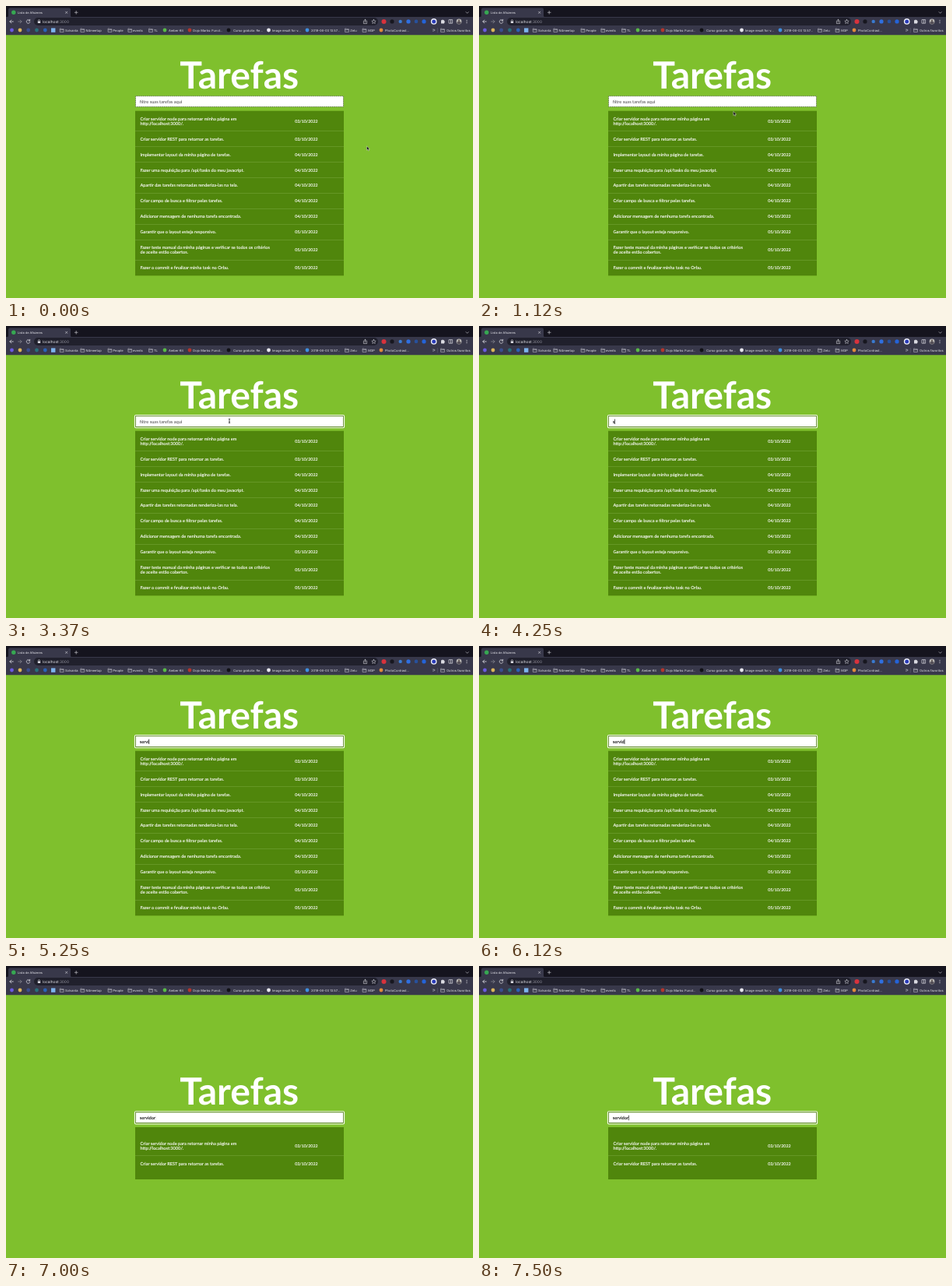
Write an HTML page that moves like this. It is 600 px wide and 375 px high and loops after 8000 ms.

```html
<!DOCTYPE html>
<html lang="pt-BR">
<head>
<meta charset="utf-8">
<title>Lista de Afazeres</title>
<style>
  html, body { margin: 0; width: 100%; height: 100%; overflow: hidden; background: #7fc02d; }
  svg { display: block; width: 100vw; height: 100vh; }
  text { font-family: Lato, "Open Sans", sans-serif; text-rendering: geometricPrecision; white-space: pre; }
  .ui text { font-family: Inter, Roboto, sans-serif; fill: #e6e6ec; }
  .title { font-size: 48px; font-weight: 700; fill: #fff; text-anchor: middle; }
  .task { font-size: 5.63px; fill: #fff; stroke: #fff; stroke-width: .13px; }
  .date { font-size: 5.3px; }
  .field { font-size: 5.7px; }
  .line { fill: none; stroke: #d9d9e0; stroke-width: .8; stroke-linecap: round; stroke-linejoin: round; }
</style>
</head>
<body>
<svg id="stage" viewBox="0 0 600 375" preserveAspectRatio="none">
  <rect width="600" height="375" fill="#7fc02d"/>
  <g id="ui" class="ui">
    <rect width="600" height="15" fill="#15141e"/>
    <path d="M0 14H1.5Q3 14 3 12.500V4.500Q3 2.500 5 2.500H81Q83 2.500 83 4.500V12.500Q83 14 84.500 14H600V37.300H0Z" fill="#38384a"/>
    <rect x="36" y="15" width="442" height="10" rx="5" fill="#20202c"/>
    <circle cx="9.800" cy="8.300" r="2.700" fill="#36a852"/>
    <g class="line">
      <path d="M76.500 7.200l2.300 2.300m0-2.300l-2.300 2.300M88.300 8.300h3.800m-1.900-1.900v3.800" stroke-width=".6"/>
      <path d="M591 7.700l1.600 1.600l1.600-1.600" stroke-width=".6"/>
      <path d="M9.300 20H4.900m2-2l-2 2l2 2"/>
      <path d="M15.700 20h4.400m-2-2l2 2l-2 2" stroke="#85858f"/>
      <path d="M30.500 18.700a2.300 2.300 0 1 0 .3 2M30.700 17.300v1.600h-1.600"/>
      <path d="M460 19.300h-.6v3.300h4.200v-3.300h-.6M461.500 21v-3.800m-1.200 1.200l1.200-1.200l1.200 1.200" stroke-width=".6"/>
      <path d="M472.500 17.300l.8 1.800l1.900.2l-1.400 1.300l.4 1.900l-1.700-1l-1.700 1l.4-1.900l-1.400-1.300l1.900-.2z" stroke-width=".55"/>
      <path d="M41.400 19.500v-.8a1.100 1.100 0 0 1 2.200 0v.8" stroke-width=".6"/>
      <path d="M548.400 29.800l1.200 1.200l-1.200 1.200m1.600-2.400l1.200 1.200l-1.200 1.200" stroke-width=".6"/>
    </g>
    <rect x="40.800" y="19.400" width="3.400" height="2.700" rx=".4" fill="#d9d9e0"/>
    <path d="M559 18.300h1.200a.8.8 0 0 1 1.600 0h1.300v1.300a.8.8 0 0 1 0 1.600v1.300h-4.100z" fill="#d9d9e0"/>
    <path d="M569 17.600h4.600v4.600h-4.600zM571.500 17.600v4.600" fill="none" stroke="#d9d9e0" stroke-width=".7"/>
    <circle cx="582" cy="20" r="3.400" fill="#b9b7b5"/>
    <path d="M579.300 22a2.700 2.200 0 0 1 5.400 0a3.400 3.400 0 0 1-5.400 0z" fill="#555058"/>
    <circle cx="582" cy="18.800" r="1.200" fill="#665d5a"/>
    <path d="M554.300 28v6.500" stroke="#66667a" stroke-width=".5"/>
  </g>
  <g id="head">
    <text class="title" x="299.700" y="105.700">Tarefas</text>
    <rect id="ring" x="165.400" y="114.500" width="269.200" height="16.300" rx="1.500" fill="none" stroke="#f6fcec" stroke-width="1.100"/>
    <rect id="box" x="166.500" y="115.700" width="267" height="13.700" fill="#fff" stroke="#3a4530" stroke-width=".8"/>
    <text id="field" class="field" x="171.700" y="124.600"></text>
    <rect id="caret" y="119.600" width=".7" height="6.400" fill="#111"/>
  </g>
  <rect id="panel" x="166" width="268" fill="#50860c"/>
  <g id="rows"></g>
  <g id="arrow">
    <path d="M0 0V5.200L1.250 4.100L2.100 6L3 5.600L2.150 3.700H3.800Z" fill="#111" stroke="#fff" stroke-width=".4"/>
  </g>
  <path id="beam" d="M-1.100-2.700Q0-2.700 0-2V2Q0 2.700-1.100 2.700M1.100-2.700Q0-2.700 0-2M0 2Q0 2.700 1.100 2.700M-.6.900H.6" fill="none" stroke="#111" stroke-width=".7"/>
</svg>
<script>
const $ = id => document.getElementById(id);

function add(parent, tag, attrs, text) {
  const el = document.createElementNS("http://www.w3.org/2000/svg", tag);
  for (const key in attrs) el.setAttribute(key, attrs[key]);
  if (text) el.textContent = text;
  parent.appendChild(el);
  return el;
}

// Browser bar
const ui = $("ui");
const label = (x, y, size, text, fill = "#e6e6ec") =>
  add(ui, "text", { x, y, "font-size": size, style: "fill:" + fill }, text);
const dot = (x, y, r, fill) => add(ui, "circle", { cx: x, cy: y, r, fill });
const folder = x => add(ui, "path", {
  d: `M${x - 2.4} 29h1.700l.6.700h2.500v3.700h-4.800zM${x - 2.4} 30.600h4.800`,
  fill: "none", stroke: "#c9c9d2", "stroke-width": .55
});

label(15, 9.8, 3.9, "Lista de Afazeres");
const host = label(47, 21.6, 4.8, "localhost");
add(host, "tspan", { fill: "#9a9aa6" }, ":3000");

[[485.5, 3, "#d8323c"], [496, 2.6, "#17171f"], [506.700, 2.2, "#3a7bd0"],
 [517, 2.6, "#2f6fe0"], [527, 2.3, "#27509c"], [537, 2.6, "#2463d8"],
 [549.700, 3.8, "#f2f3fa"], [549.700, 2.5, "#2a3bb8"]
].forEach(([x, r, fill]) => dot(x, 19.9, r, fill));
[18.2, 20, 21.8].forEach(y => dot(592, y, .55, "#d9d9e0"));

[[7.5, "#6a5ae0"], [18, "#d9b45a"], [28.700, "#3a4f8e"], [39.5, "#28707a"], [50.3, "#2a62b8"],
 [204, "#58b947"], [236, "#b3362d"], [286, "#111116"], [337.5, "#e8e8ee"],
 [387, "#3f8fe0"], [482, "#e08a3c"]
].forEach(([x, fill]) => dot(x, 31, 2.4, fill));
add(ui, "rect", { x: 58, y: 28.4, width: 5.4, height: 5.4, fill: "#7db4ee" });
[71.700, 98.3, 133.5, 159.3, 186, 438, 460.5, 561].forEach(folder);

[[76, "Solvanta"], [102.5, "N4meetup"], [137.5, "People"], [163, "events"], [190, "TL"],
 [209, "Amber Kit"], [240.3, "Dojo Marks: Funct..."], [292, "Curso gratuito: Re..."],
 [342, "Image result for v..."], [392, "2019-06-03 13.57..."], [442.3, "Zelu"],
 [465.2, "M3P"], [487, "PhotoContrast..."], [566, "Outros favoritos"]
].forEach(([x, text]) => label(x, 32.5, 4.05, text));

// Task list: centre of row, lines, day
const tasks = [
  [147.700, ["Criar servidor node para retornar minha página em", "http://localhost:3000/."], 3],
  [170.6, ["Criar servidor REST para retornar as tarefas."], 3],
  [190.6, ["Implementar layout da minha página de tarefas."], 4],
  [210.6, ["Fazer uma requisição para /api/tasks do meu javacript."], 4],
  [230.5, ["Apartir das tarefas retornadas renderiza-las na tela."], 4],
  [250.5, ["Criar campo de busca e filtrar pelas tarefas."], 4],
  [270.4, ["Adicionar mensagem de nenhuma tarefa encontrada."], 4],
  [290.3, ["Garantir que o layout esteja responsivo."], 5],
  [313.3, ["Fazer teste manual da minha páginas e verificar se todos os critérios", "de aceite estão cobertos."], 5],
  [336.4, ["Fazer o commit e finalizar minha task no Orbu."], 5]
];
const rows = tasks.map(([y, lines, day], i) => {
  const row = add($("rows"), "g", {});
  lines.forEach((text, n) => add(row, "text", {
    class: "task", x: 172.5, y: y + 1.9 + (n - (lines.length - 1) / 2) * 6.2
  }, text));
  add(row, "text", { class: "task date", x: 371.2, y: y + 1.9 }, `0${day}/10/2022`);
  if (i) {
    const top = y - (lines.length > 1 ? 13 : 10);
    add(row, "rect", { x: 166, y: top - .2, width: 268, height: .5, fill: "#7aa63f" });
  }
  return row;
});

// Timeline in ticks of 125 ms
const TICK = 125, LOOP = 8000;
const FOCUS = 14, TYPING = 33, FILTER = 56;
const keys = [33, 35, 38, 39, 40, 49, 51, 52];
const blink = [
  [0, 0], [14, .75], [15, 1], [17, .67], [18, .33], [19, 0], [22, .5], [23, 1],
  [25, .67], [26, .33], [27, 0], [30, .5], [31, 1], [43, .5], [44, 0], [46, .5],
  [47, 1], [55, .7], [56, .1], [57, 0], [59, .5], [60, 1]
];
const path = [[0, 463.5, 180], [2, 463.5, 180], [5, 400, 160], [6, 400, 160], [11, 287, 122]];

const stepAt = k => blink.filter(s => s[0] <= k).pop()[1];

function pointAt(k) {
  const i = path.findIndex(p => p[0] > k);
  if (i < 0) return path[path.length - 1].slice(1);
  const [a, x, y] = path[i - 1], [b, u, v] = path[i];
  const p = (k - a) / (b - a), e = p * p * (3 - 2 * p);
  return [x + (u - x) * e, y + (v - y) * e];
}

const show = (el, on) => el.setAttribute("visibility", on ? "visible" : "hidden");
let last = -1;

function draw(k) {
  const focused = k >= FOCUS, filtered = k >= FILTER;
  const typed = "servidor".slice(0, keys.filter(n => n <= k).length);
  const field = $("field");
  field.textContent = typed || "filtre suas tarefas aqui";
  field.setAttribute("fill", typed ? "#111" : "#555");
  field.setAttribute("stroke", typed ? "#111" : "#555");
  field.setAttribute("stroke-width", typed ? .12 : .04);
  const end = typed ? field.getComputedTextLength() : 0;
  $("caret").setAttribute("x", 171.6 + end);
  $("caret").setAttribute("opacity", stepAt(k));
  show($("ring"), focused);
  $("box").setAttribute("stroke-dasharray", focused ? "none" : ".8 .8");
  $("box").setAttribute("stroke", focused ? "#5b7f2c" : "#3a4530");

  $("head").setAttribute("transform", `translate(0 ${filtered ? 72.2 : 0})`);
  $("panel").setAttribute("y", filtered ? 207 : 134.700);
  $("panel").setAttribute("height", filtered ? 67 : 211.6);
  $("rows").setAttribute("transform", `translate(0 ${filtered ? 83 : 0})`);
  rows.forEach((row, i) => show(row, !filtered || i < 2));

  const [x, y] = pointAt(k);
  const over = y > 115 && y < 130 && x < 434;
  const at = `translate(${x} ${y})`;
  $("arrow").setAttribute("transform", at);
  $("beam").setAttribute("transform", at);
  show($("arrow"), !over);
  show($("beam"), over && k < TYPING);
}

const start = performance.now();
function frame() {
  const t = (performance.now() - start) % LOOP;
  const k = Math.floor((t + 5) / TICK);
  if (k !== last) draw(last = k);
  requestAnimationFrame(frame);
}
frame();
</script>
</body>
</html>
```
